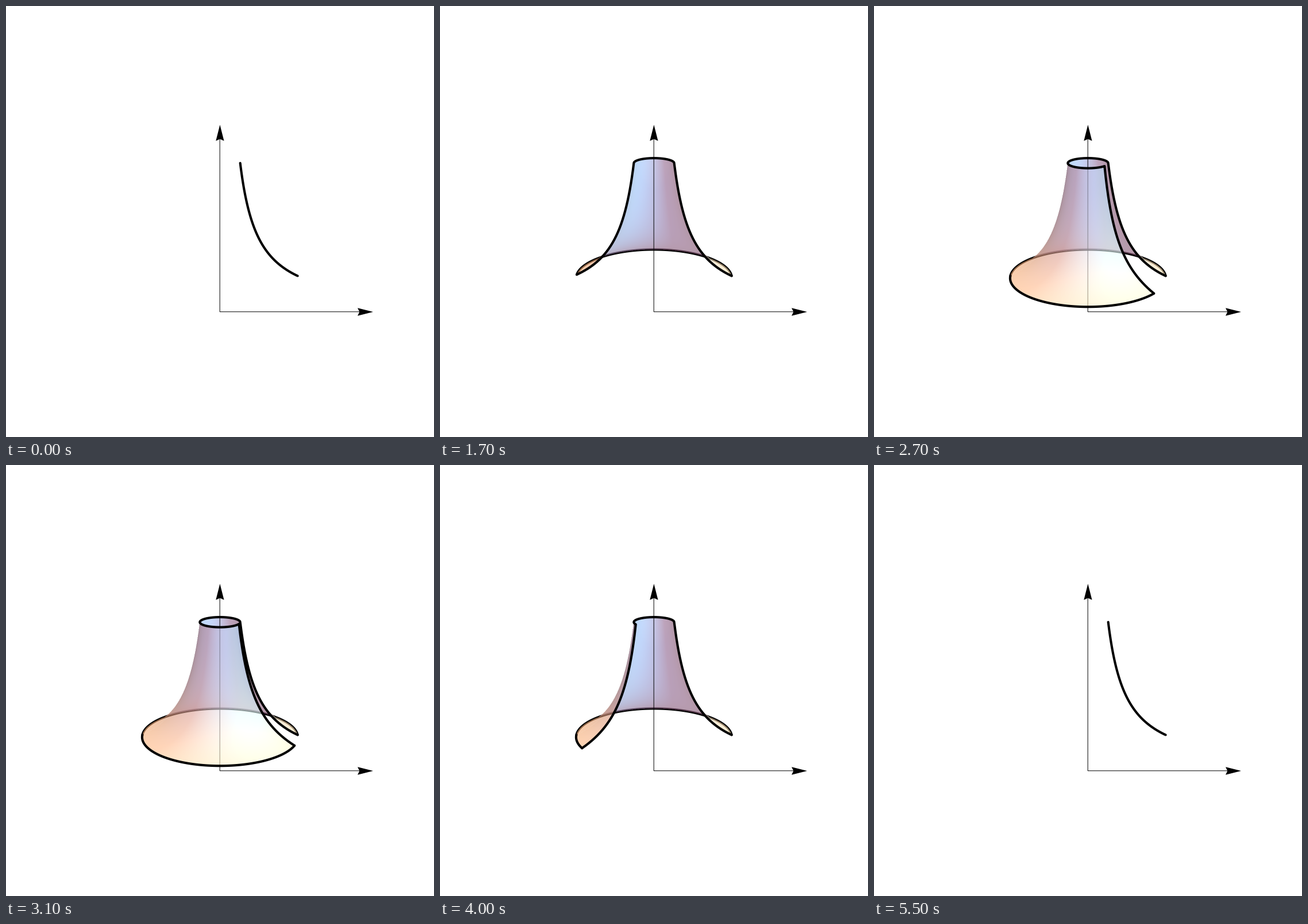
Write a matplotlib script that moves like this. It is 745 px wide and 751 px high and loops after 6 s.

```python
import numpy as np
import matplotlib.pyplot as plt
from matplotlib.animation import FuncAnimation
from matplotlib.patches import Polygon

W, H, DPI = 745, 751, 100
PX = 72 / DPI                      # one pixel in points
CX, CY = 372.5, 375.5              # principal point on the stage
UNIT = 66.7                        # pixels per world unit at the origin
ORIGIN_Y = 532.5
LIFT = ORIGIN_Y - CY
DIST = 1610.0                      # camera distance in pixels
SIN, COS = 0.311, 0.9504           # camera elevation
R_TOP, R_LOW, K = 0.5, 2.0, 2.0    # profile z = K / r
OPACITY = 0.6
STEPS = 25

AMBIENT = np.array([0.49, 0.29, 0.35])
LIGHTS = [  # direction (right, back, up), colour
    ((0.0, -0.2, 0.98), (0.55, 0.45, 0.13)),
    ((0.83, -0.52, 0.2), (0.06, 0.42, 0.50)),
    ((0.0, -1.0, 0.0), (0.07, 0.11, 0.24)),
]

# Part of the stage that the surface can cover
X0, X1, Y0, Y1 = 232, 514, 260, 530
SS = 2


def project(r, theta):
    """Stage position of the surface point at radius r and angle theta."""
    r, theta = np.broadcast_arrays(r, theta)
    x, y, z = r * np.cos(theta), r * np.sin(theta), K / r
    toward = UNIT * (z * SIN - y * COS)
    up = UNIT * (z * COS + y * SIN)
    scale = 1 / (1 - toward / DIST)
    return CX + UNIT * x * scale, CY - (up - LIFT) * scale


def shade(x, y, r, view):
    """Lit colour of the side of the surface that faces the camera."""
    slope = K / r**2
    n = np.stack([slope * x / r, slope * y / r, np.ones_like(r)], axis=1)
    n /= np.linalg.norm(n, axis=1, keepdims=True)
    n *= np.where(np.sum(n * view, axis=1) < 0, -1, 1)[:, None]
    rgb = np.tile(AMBIENT, (len(r), 1))
    for direction, colour in LIGHTS:
        rgb += np.clip(n @ np.array(direction), 0, None)[:, None] * np.array(colour)
    return np.clip(rgb, 0, 1)


def trace():
    """March all pixel rays from far to near and collect surface hits."""
    cols = X0 + (np.arange((X1 - X0) * SS) + 0.5) / SS
    rows = Y0 + (np.arange((Y1 - Y0) * SS) + 0.5) / SS
    sx, sy = (g.ravel() for g in np.meshgrid(cols - CX, rows - CY))

    def at(w, px, py):
        q = 1 - w / DIST
        up = LIFT - py * q
        return (px * q / UNIT, (up * SIN - w * COS) / UNIT,
                (up * COS + w * SIN) / UNIT)

    hits, last = [], None
    depths = np.arange(-112, 156, 1.6)
    for i, w in enumerate(depths):
        x, y, z = at(w, sx, sy)
        f = z * np.hypot(x, y) - K
        if last is not None:
            idx = np.flatnonzero((f > 0) != (last > 0))
            part = last[idx] / (last[idx] - f[idx])
            wh = depths[i - 1] + part * (w - depths[i - 1])
            x, y, z = at(wh, sx[idx], sy[idx])
            r = np.hypot(x, y)
            ok = (r >= R_TOP) & (r <= R_LOW)
            if ok.any():
                idx, x, y, r = idx[ok], x[ok], y[ok], r[ok]
                px, py = sx[idx], sy[idx]
                view = np.stack([-px, py * SIN - DIST * COS,
                                 py * COS + DIST * SIN], axis=1)
                angle = np.mod(np.arctan2(y, x), 2 * np.pi)
                hits.append((idx, angle, shade(x, y, r, view)))
        last = f
    return hits


HITS = trace()


def sheet(lo, hi):
    """RGBA picture of the surface between two angles."""
    h, w = (Y1 - Y0) * SS, (X1 - X0) * SS
    buf = np.zeros((h * w, 4))
    for idx, angle, rgb in HITS:
        on = (angle >= lo) & (angle < hi)
        if on.any():
            j = idx[on]
            buf[j] *= 1 - OPACITY
            buf[j, :3] += OPACITY * rgb[on]
            buf[j, 3] += OPACITY
    img = buf.reshape(h // SS, SS, w // SS, SS, 4).mean(axis=(1, 3))
    img[..., :3] /= np.maximum(img[..., 3:], 1e-6)
    return np.clip(img, 0, 1)


fig = plt.figure(figsize=(W / DPI, H / DPI), dpi=DPI, facecolor="white")
ax = fig.add_axes([0, 0, 1, 1])
ax.axis("off")

EMPTY = np.zeros((Y1 - Y0, X1 - X0, 4))


def picture(z):
    return ax.imshow(EMPTY, extent=(X0, X1, Y1, Y0), aspect="auto",
                     interpolation="nearest", zorder=z)


def stroke(z, width=4.1):
    return ax.plot([], [], color="black", lw=width * PX, zorder=z, snap=False,
                   solid_capstyle="round", solid_joinstyle="round")[0]


back_rim = stroke(1)
back = picture(2)
axes_line = stroke(3, 1.0)
axes_line.set_solid_joinstyle("miter")
axes_line.set_data([372.2, 372.2, 620], [226, 532.8, 532.8])
front = picture(4)
front_rim = stroke(5)
outline = stroke(5)

for head in ([(372.4, 207), (365.3, 235), (372.4, 231.8), (379.5, 235)],
             [(639, 533), (612, 526.2), (615.3, 533), (612, 539.8)]):
    ax.add_patch(Polygon(head, closed=True, fc="black", ec="none", zorder=3))

ax.set_xlim(0, W)
ax.set_ylim(H, 0)

PROFILE = np.geomspace(R_LOW, R_TOP, 60)


def sweep(step):
    return np.radians(1.3 + 14.67 * (step - 1)) if step else 0.0


def arc(r, lo, hi):
    return project(r, np.linspace(lo, hi, 90)) if hi > lo else ([], [])


def draw(i):
    step = int(np.clip(min(i - 4, 55 - i), 0, STEPS))
    end = sweep(step)
    back.set_data(sheet(0, min(end, np.pi)) if step else EMPTY)
    front.set_data(sheet(np.pi, end) if end > np.pi else EMPTY)
    back_rim.set_data(*arc(R_LOW, 0, min(end, np.pi)))
    front_rim.set_data(*arc(R_LOW, np.pi, end))
    pieces = [project(PROFILE, 0.0)]
    if step:
        pieces += [arc(R_TOP, 0, end), project(PROFILE[::-1], end)]
    outline.set_data(*np.hstack(pieces))
    return back_rim, back, axes_line, front, front_rim, outline


anim = FuncAnimation(fig, draw, frames=60, interval=100, repeat=True,
                     repeat_delay=0, blit=False)
plt.show()
```
